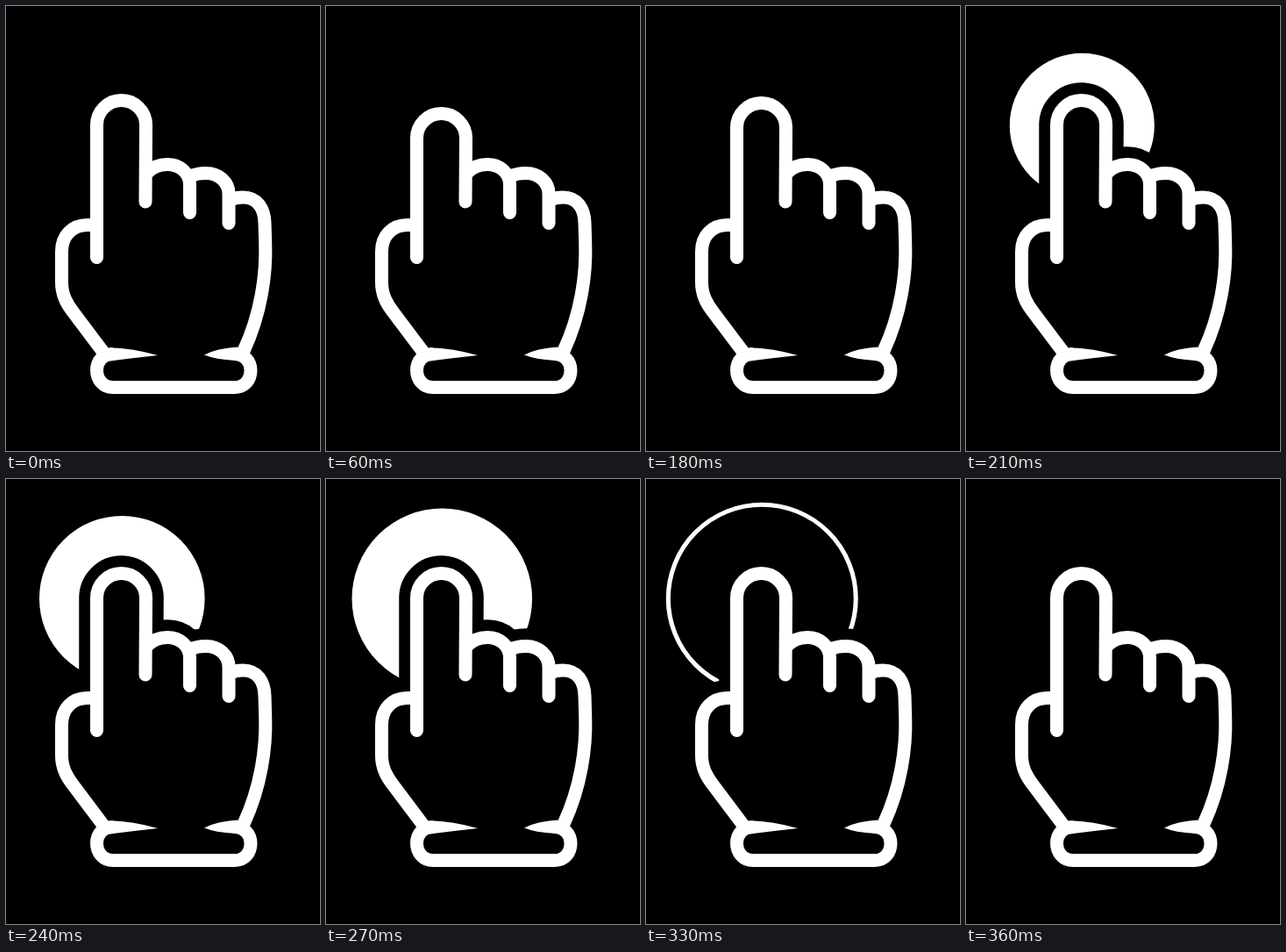
Recreate the animation shown at these times as an HTML page. Size 358 by 507 pixels, loop 450 ms.

```html
<!DOCTYPE html>
<html lang="en">
<head>
<meta charset="utf-8">
<title>Tap</title>
<style>
html, body { margin: 0; width: 100%; height: 100%; overflow: hidden; background: #000; }
svg { display: block; width: 100%; height: 100%; }
</style>
</head>
<body>
<svg viewBox="0 0 358 507" fill="none" stroke-linecap="round" stroke-linejoin="round">
  <defs>
    <g id="hand">
      <path id="finger"/>
      <path d="M161 190Q170 180.5 184 180.5C198 180.5 209.5 190 209.5 204V235.5"/>
      <path d="M211 194Q217 190.5 228 190.5C243 190.5 254 201 254 214V247.5"/>
      <path d="M257 220.5Q262 218 270 218C287 218 294.5 231 295 247L295.7 270C297 305 291 350 271 393"/>
      <path d="M102 249.5H93C75 249.5 63.5 262 63.5 280V315C63.5 330 70 340 76 348L110.6 394"/>
      <path d="M120 396.8C110 397 103.5 405 103.5 415C103.5 426 111 434.5 122 434.5H261C272 434.5 279 426 279 415C279 405 272 397 262 396.5"/>
    </g>
  </defs>
  <g id="press">
    <circle id="ring" cx="132.3" cy="136.2" stroke="#fff"/>
    <use href="#hand" stroke="#000" stroke-width="40.5"/>
    <path fill="#000" d="M103 135A28 28 0 0 1 160 135V185H209V195H254V220L295 250V300L271 394H110L64 315V270L103 249Z"/>
  </g>
  <use href="#hand" stroke="#fff" stroke-width="15"/>
  <path fill="#fff" d="M118 389.3Q145 390 173 398Q145 401 120 404.3ZM264 388.5Q240 390 226 397.5Q238 402.5 262 404Z"/>
</svg>
<script>
const LOOP = 450, STEP = 30;
const el = id => document.getElementById(id);
const finger = el('finger'), press = el('press'), ring = el('ring');
const clamp = x => Math.min(1, Math.max(0, x));
const smooth = x => x * x * (3 - 2 * x);

function draw(t) {
  // fingertip dips, then springs up
  const dip = 30 * (t < 120 ? smooth(t / 120) : 1 - smooth(clamp((t - 120) / 75)));
  const y = 135.5 + dip;
  finger.setAttribute('d', `M103.5 286.5V${y}A28 28 0 0 1 159.5 ${y}L159 223`);

  // disc grows and is hollowed out from the middle
  const on = t >= 210 && t < 360;
  press.style.display = on ? '' : 'none';
  if (!on) return;
  const outer = 109.5 - 27 * clamp((330 - t) / 120) ** 2;
  const inner = 105 * (1 - clamp((345 - t) / 84.5) ** 3);
  ring.setAttribute('r', (outer + inner) / 2);
  ring.setAttribute('stroke-width', outer - inner);
}

const start = performance.now();
function tick() {
  const t = (performance.now() - start) % LOOP;
  draw(Math.floor(t / STEP) * STEP);
  requestAnimationFrame(tick);
}
tick();
</script>
</body>
</html>
```
